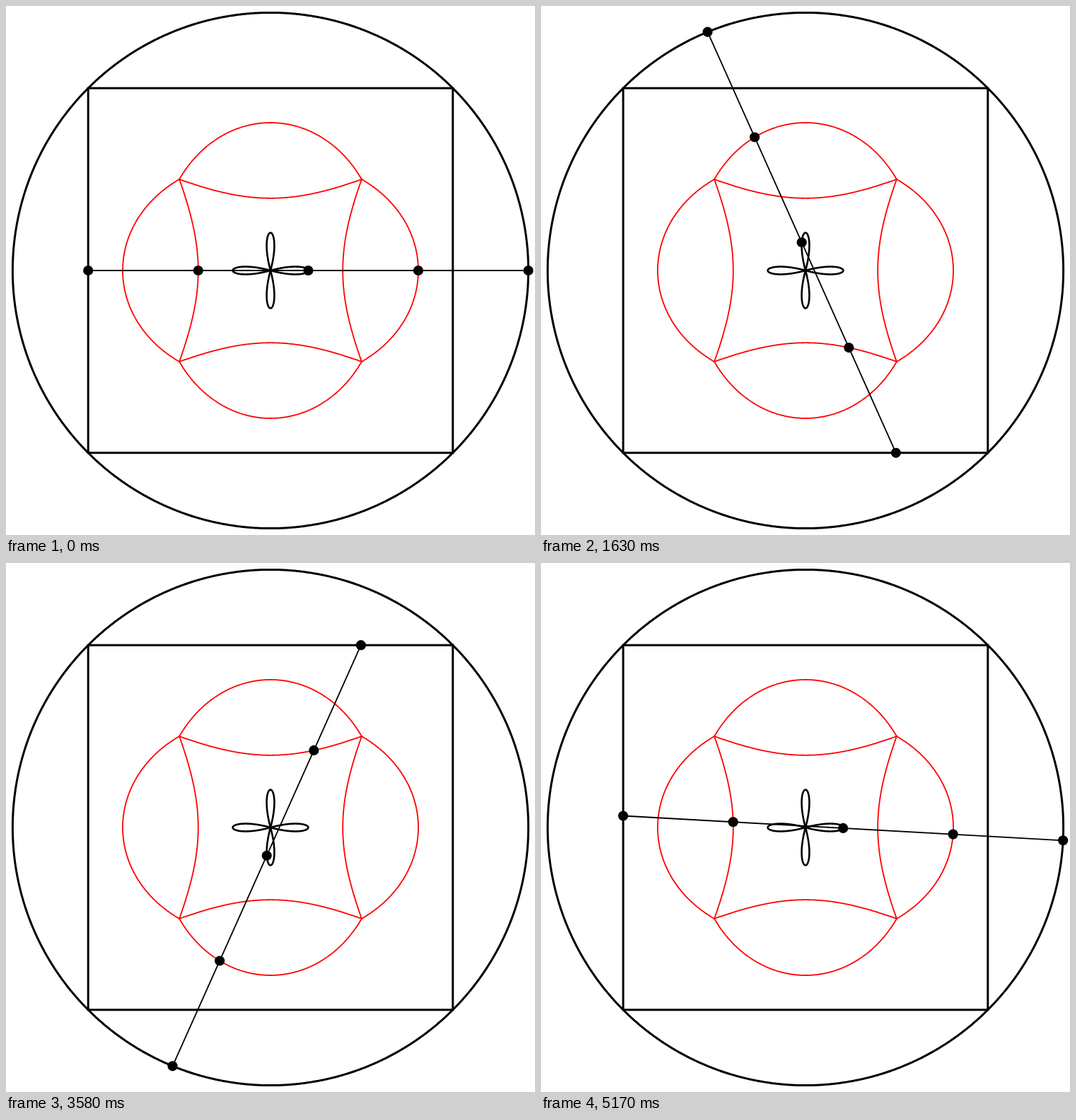
Animation, 748 px wide and 748 px high, one loop 5210 ms. Source, as an HTML page with a canvas:

```html
<!DOCTYPE html>
<html lang="en">
<head>
<meta charset="utf-8">
<title>Curves between a circle and a square</title>
<style>
html, body { margin: 0; width: 100%; height: 100%; overflow: hidden; background: #fff; }
canvas { display: block; width: 748px; height: 748px; }
</style>
</head>
<body>
<canvas id="stage" width="748" height="748"></canvas>
<script>
const ctx = document.getElementById('stage').getContext('2d');
const C = 374, R = 364.6, HALF = R / Math.SQRT2;
const LOOP = 5210, STEPS = 125;

// Point on the square, moving along its sides at constant speed
function squarePoint(a) {
  const turn = Math.round(a / (Math.PI / 2)) * Math.PI / 2;
  const u = (a - turn) / (Math.PI / 4);
  const c = Math.cos(turn), s = Math.sin(turn);
  return [HALF * (c - u * s), HALF * (s + u * c)];
}

// Point on the rod: q = 0 on the circle, q = 1 on the far side of the square
function rodPoint(a, q) {
  const [sx, sy] = squarePoint(a);
  const x = R * Math.cos(a) * (1 - q) - sx * q;
  const y = R * Math.sin(a) * (1 - q) - sy * q;
  return [C + x, C - y];
}

function trace(q, color, width) {
  ctx.beginPath();
  for (let i = 0; i < 1440; i++) ctx.lineTo(...rodPoint(i * Math.PI / 720, q));
  ctx.closePath();
  ctx.strokeStyle = color;
  ctx.lineWidth = width;
  ctx.stroke();
}

function draw(a) {
  ctx.fillStyle = '#fff';
  ctx.fillRect(0, 0, 748, 748);
  ctx.lineJoin = 'miter';

  trace(0.25, '#f00', 1.8);
  trace(0.75, '#f00', 1.8);
  trace(0.5, '#000', 2.6);
  trace(0, '#000', 3);
  ctx.strokeRect(C - HALF, C - HALF, 2 * HALF, 2 * HALF);

  ctx.beginPath();
  ctx.moveTo(...rodPoint(a, 0));
  ctx.lineTo(...rodPoint(a, 1));
  ctx.lineWidth = 1.8;
  ctx.stroke();

  ctx.fillStyle = '#000';
  for (let i = 0; i <= 4; i++) {
    ctx.beginPath();
    ctx.arc(...rodPoint(a, i / 4), 7.1, 0, 2 * Math.PI);
    ctx.fill();
  }
}

// 24 poses a second, timed to the nearest 10 ms
function stepAt(ms) {
  const tick = Math.floor(ms / 10);
  return Math.ceil((tick + 0.5) * 6 / 25) - 1;
}

function frame() {
  draw(stepAt(performance.now() % LOOP) / STEPS * 2 * Math.PI);
  requestAnimationFrame(frame);
}
frame();
</script>
</body>
</html>
```
